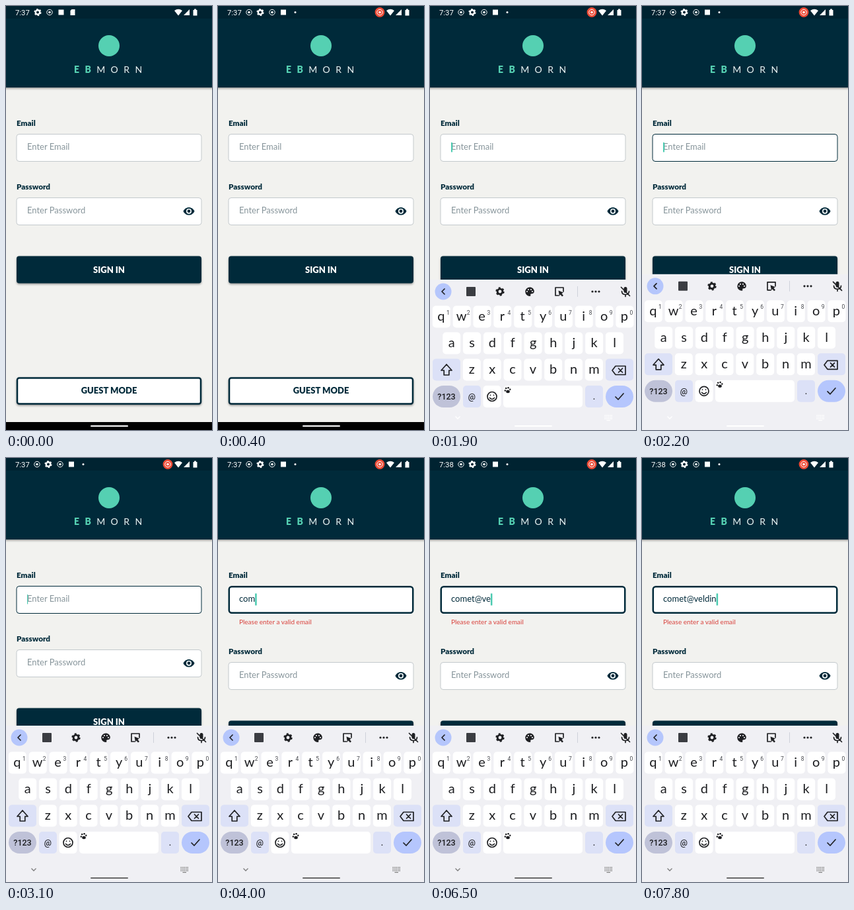
Animation of 312 by 640 pixels, one loop 8 s. Source, as an HTML page:

```html
<!DOCTYPE html>
<html lang="en">
<head>
<meta charset="utf-8">
<title>Sign in</title>
<style>
  html, body { margin: 0; width: 100%; height: 100%; overflow: hidden; background: #f2f2ef; }
  svg { display: block; width: 100%; height: 100%; }
  text { font: 13px Lato, sans-serif; fill: #002a3a; }
  .label { font-size: 11.7px; font-weight: 900; }
  .button { font-weight: 900; text-anchor: middle; }
  .hint { fill: #87959b; }
  .error { font-size: 10px; fill: #d9413c; }
  .brand { font-size: 14px; letter-spacing: 8.4px; fill: #e9f2f2; }
  .brand tspan { font-weight: 900; fill: #55d0b2; }
  .status text { font: 11.3px Roboto, sans-serif; fill: #fff; }
  .keys text { font: 20px Lato, sans-serif; fill: #1c1d20; text-anchor: middle; }
  .keys .digit { font: 8.5px Roboto, sans-serif; fill: #44464c; }
  .keys .small { font: 500 12.5px Roboto, sans-serif; }
  .line { fill: none; stroke: currentColor; stroke-width: 1.7; stroke-linecap: round; stroke-linejoin: round; }
</style>
</head>
<body>
<svg viewBox="0 0 312 640">
  <defs>
    <filter id="shadow" x="-10%" y="-20%" width="120%" height="150%" color-interpolation-filters="sRGB">
      <feDropShadow dx="0" dy="1.5" stdDeviation="1.5" flood-opacity=".4"/>
    </filter>
    <g id="gear" fill="none" stroke="currentColor">
      <circle r="3.2" stroke-width="2.4"/>
      <circle r="4.7" stroke-width="1.7" stroke-dasharray="2.46"/>
    </g>
    <g id="record">
      <circle r="4.2" fill="none" stroke="currentColor"/>
      <circle r="1.8" fill="currentColor"/>
    </g>
    <rect id="mail" x="-4" y="-4" width="8" height="8" fill="currentColor"/>
  </defs>

  <rect width="312" height="640" fill="#f2f2ef"/>
  <rect x="-20" y="-20" width="352" height="143" fill="#002a3a" filter="url(#shadow)"/>
  <rect width="312" height="19" fill="#002331"/>
  <circle cx="156" cy="60" r="16" fill="#55d0b2"/>
  <text class="brand" x="103" y="101"><tspan>EB</tspan>MORN</text>

  <g class="status" color="#fff">
    <text id="clock" x="14" y="13.5"></text>
    <g id="before">
      <use href="#gear" x="48" y="9.5"/>
      <use href="#record" x="66" y="9.5"/>
      <use href="#mail" x="83.5" y="9.5"/>
      <path d="M97.5 7l2-2h5v9h-7z" fill="#fff"/>
    </g>
    <g id="after">
      <use href="#record" x="47" y="9.5"/>
      <use href="#gear" x="64" y="9.5"/>
      <use href="#record" x="82" y="9.5"/>
      <use href="#mail" x="99" y="9.5"/>
      <circle cx="117" cy="9.5" r="1.5" fill="#fff"/>
      <circle cx="245" cy="9.5" r="7.4" fill="#ee4a35"/>
      <use href="#record" x="245" y="9.5"/>
    </g>
    <path d="M255 7q6-4.5 12 0l-6 7.500zM278 5v9h-9z" fill="#fff"/>
    <path d="M283.5 6h1.500v-1.500h3v1.500h1.500v8.500h-6z" fill="#fff"/>
  </g>

  <text class="label" x="16" y="181.2">Email</text>
  <rect id="email" rx="4" fill="#fff"/>
  <text id="typed" x="32" y="217"></text>
  <rect id="caret" fill="#4bcab0"/>
  <text id="error" class="error" x="32" y="250.5">Please enter a valid email</text>

  <g id="lower">
    <text class="label" x="16" y="277">Password</text>
    <rect x="16" y="289.5" width="280" height="41" rx="4" fill="#fff" stroke="#c3c9cc"/>
    <text class="hint" x="32" y="313">Enter Password</text>
    <g transform="translate(277 309.7)" fill="#002a3a">
      <path d="M-8.5 0C-7-3.5-3.7-5.8 0-5.8S7-3.5 8.5 0C7 3.5 3.7 5.8 0 5.8S-7 3.5-8.5 0Z"/>
      <circle r="4" fill="#fff"/><circle r="2.4"/>
    </g>
    <rect x="16" y="377.5" width="280" height="41" rx="4" fill="#002a3a" filter="url(#shadow)"/>
    <text class="button" x="156" y="402.5" style="fill:#fff">SIGN IN</text>
  </g>
  <rect x="17" y="561.5" width="278" height="39" rx="3" fill="#fff" stroke="#002a3a" stroke-width="2.5" filter="url(#shadow)"/>
  <text class="button" x="156" y="585">GUEST MODE</text>
  <rect y="628" width="312" height="12"/>

  <g id="keyboard" class="keys" color="#1f2023">
    <rect y="404" width="312" height="240" fill="#f0f0f4"/>
    <circle cx="20" cy="422" r="12.5" fill="#b5c6fc"/>
    <path class="line" d="M22 418l-4 4l4 4"/>
    <rect x="55" y="415" width="14" height="14" rx="1" fill="#3b3d42"/>
    <use href="#gear" transform="translate(106 422) scale(1.2)"/>
    <g fill="#f0f0f4">
      <path d="M151 415.500a6.700 6.700 0 1 0 0 13.400c2 0 1.200-1.800 1.200-2.500 0-1.800 5.600.4 5.600-4.800 0-3.500-3-6.100-6.800-6.100z" fill="#1f2023"/>
      <circle cx="147" cy="422" r="1.1"/><circle cx="149" cy="419" r="1.1"/>
      <circle cx="153" cy="419" r="1.1"/><circle cx="155" cy="422" r="1.1"/>
    </g>
    <g fill="#1f2023">
      <path class="line" d="M195 428h-5v-12h12v6"/>
      <path d="M194.500 420.500l7.500 3-2.500 1.500 2.500 3-2 1.500-2.500-3-1.500 2z"/>
      <circle cx="246" cy="422" r="1.6"/><circle cx="251" cy="422" r="1.6"/><circle cx="256" cy="422" r="1.6"/>
      <rect x="293.5" y="415" width="5" height="9" rx="2.5"/>
    </g>
    <path d="M223.500 414v16" stroke="#cfd1da"/>
    <path class="line" d="M290.500 421.500q0 5 5.500 5t5.500-5M296 426.500v3M289.500 415.500l13 13"/>
    <g id="keys"></g>
    <path class="line" d="M25 532l-8 9h4.200v7h7.600v-7h4.200z"/>
    <path class="line" d="M276 541l5-6.500h15v13h-15zM285.500 538l6 6m0-6l-6 6"/>
    <path class="line" d="M281 581l4 4l8-9"/>
    <circle class="line" cx="94" cy="580.5" r="7"/>
    <path class="line" d="M90.500 582.500q3.500 4 7 0M91.500 578.300v.1M96.500 578.300v.1"/>
    <g fill="#1c1d20">
      <ellipse cx="118" cy="573" rx="2.8" ry="2.2"/>
      <circle cx="113.800" cy="571.5" r="1.2"/><circle cx="115.2" cy="568" r="1.3"/>
      <circle cx="118.600" cy="567.3" r="1.3"/><circle cx="121.3" cy="569.7" r="1.2"/>
    </g>
  </g>

  <g id="nav" fill="none" stroke="currentColor">
    <path d="M38.500 619.5l3.500 3.500l3.500-3.500" stroke-width="1.3"/>
    <path d="M264.500 618h11.500M264.500 620.5h11.500M264.500 623h11.500" stroke-width="1.5" stroke-dasharray="1.5 1"/>
    <path d="M267.500 625.5h5.500" stroke-width="1.2"/>
  </g>
  <rect id="pill" x="128" y="633" width="57" height="2" rx="1"/>
</svg>
<script>
const $ = id => document.getElementById(id);
const set = (id, attrs) => { for (const k in attrs) $(id).setAttribute(k, attrs[k]); };
const show = (id, on) => $(id).style.display = on ? '' : 'none';

const key = (x, y, w, fill = '#fff', r = 5) =>
  `<rect x="${x}" y="${y - 16.5}" width="${w}" height="33" rx="${r}" fill="${fill}"/>`;
const row = (letters, x0, y, digits = '') => [...letters].map((c, i) => {
  const x = x0 + i * 30.85;
  const digit = digits ? `<text class="digit" x="${x + 10}" y="${y - 3.5}">${digits[i]}</text>` : '';
  return key(x - 13.5, y, 27) + `<text x="${x - (digits ? .5 : 0)}" y="${y + 6}">${c}</text>` + digit;
}).join('');
const small = (c, x) => `<text class="small" x="${x}" y="585">${c}</text>`;
const pale = '#dce1f7';

$('keys').innerHTML =
  row('qwertyuiop', 17.3, 460, '1234567890') + row('asdfghjkl', 32.7, 500) + row('zxcvbnm', 63.3, 540) +
  key(4, 540, 42, pale) + key(266, 540, 42, pale) +
  key(4, 580.5, 42, '#bfc2d8', 16.5) + key(50, 580.5, 27, pale) + key(80.5, 580.5, 27) +
  key(111, 580.5, 120) + key(235, 580.5, 27, pale) + key(266, 580.5, 42, '#b5c6fd', 16.5) +
  small('?123', 25) + small('@', 63.3) + small('.', 248.5);

const address = 'comet@veldin';
const strokes = [3300, 3500, 3900, 4100, 4200, 4700, 6400, 6500, 7100, 7300, 7700, 7800];

function draw(t) {
  const count = strokes.filter(s => t >= s).length;
  const open = t >= 1500;

  $('clock').textContent = t < 4500 ? '7:37' : '7:38';
  show('before', t < 200);
  show('after', t >= 200);

  // Keyboard settles exponentially
  const drop = t < 2300 ? 45 * Math.exp((1700 - t) / 124.3) : 0;
  show('keyboard', open);
  set('keyboard', { transform: `translate(0 ${drop})` });

  // Navigation icons darken once the keyboard rests
  const dark = Math.min(1, Math.max(0, (t - 2200) / 900));
  const grey = v => `rgb(${Array(3).fill(255 - (255 - v) * dark)})`;
  show('nav', t >= 1700);
  set('nav', { color: grey(125) });
  set('pill', { fill: grey(105) });

  $('typed').textContent = count ? address.slice(0, count) : 'Enter Email';
  set('typed', { class: count ? '' : 'hint' });

  // The border thickens inwards
  const line = t < 3500 ? 1 : 2.5;
  const inset = (line - 1) / 2;
  set('email', {
    x: 16 + inset, y: 193.5 + inset, width: 280 - 2 * inset, height: 41 - 2 * inset,
    stroke: t < 2100 ? '#c3c9cc' : '#002a3a', 'stroke-width': line
  });

  const end = count ? $('typed').getComputedTextLength() : 0;
  show('caret', open && !(t >= 5400 && t < 5900));
  set('caret', count
    ? { x: 32 + end, y: 204.5, width: 2.5, height: 18 }
    : { x: 32, y: 206, width: t < 2400 ? 2 : 1.2, height: 14.5 });

  show('error', count);
  set('lower', { transform: `translate(0 ${count ? 19 : 0})` });
}

function tick() {
  draw(Math.floor(performance.now() % 8000 / 100) * 100);
  requestAnimationFrame(tick);
}
tick();
</script>
</body>
</html>
```
